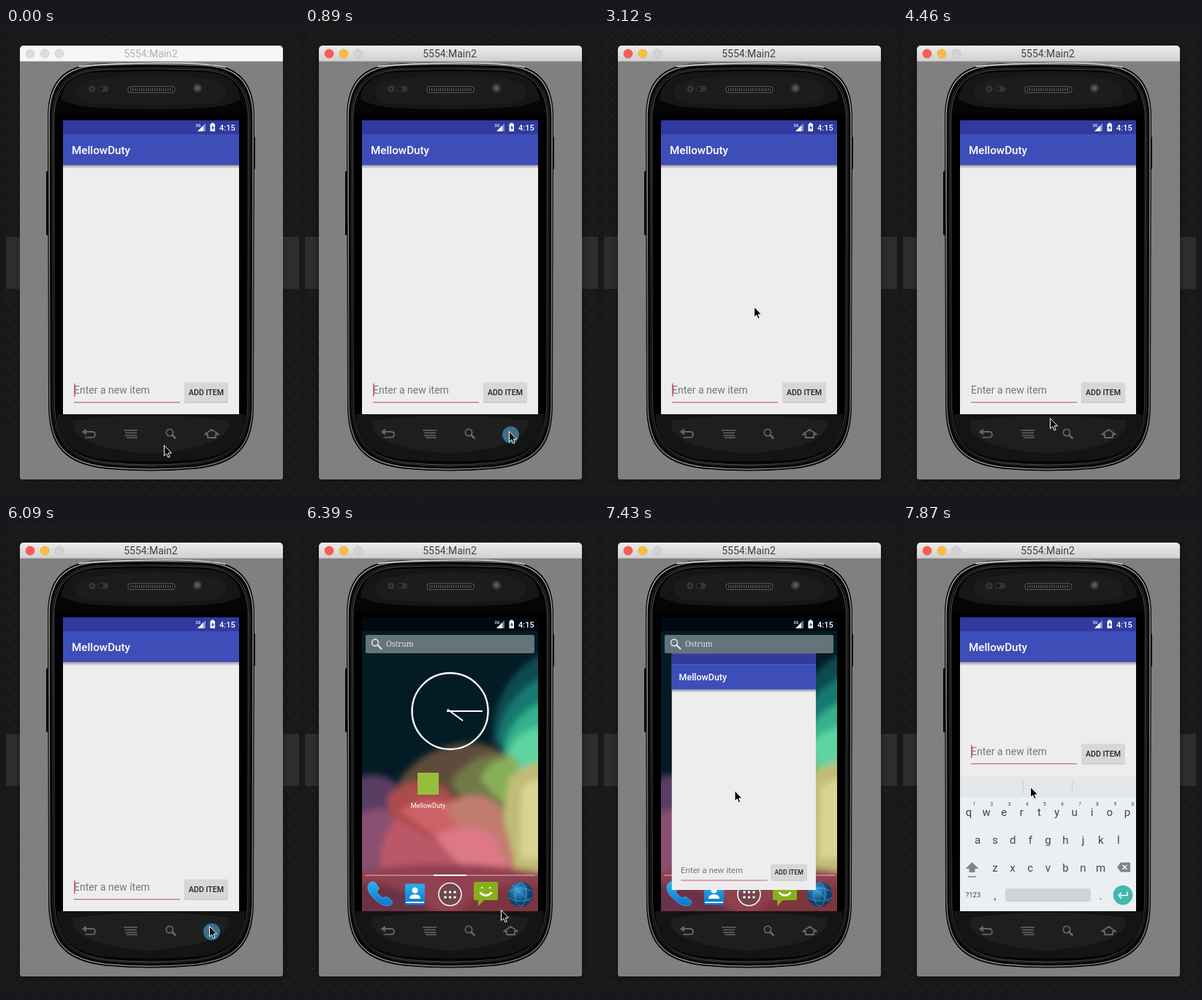
An HTML page that plays this animation: 401 px wide and 640 px high, repeating every 8 s.

```html
<!DOCTYPE html>
<html lang="en">
<head>
<meta charset="utf-8">
<title>Emulator demo</title>
<style>
  html, body { margin: 0; width: 100%; height: 100%; overflow: hidden; background: #191919; }
  svg { display: block; width: 100%; height: 100%; font-family: Roboto, sans-serif; }
  .mid { text-anchor: middle; }
  .medium { font-weight: 500; }
  .line { fill: none; stroke-linecap: round; stroke-linejoin: round; }
  #title { font-size: 14px; fill: #414141; }
  .idle #title { fill: #b3b3b3; }
  .idle #lights circle { fill: #dcdcdc; stroke: #cfcfcf; }
  .idle #bar { fill: #f6f6f6; }
  .idle #shadow { opacity: .1; }
  #keys { fill: #37474f; font-size: 15px; }
</style>
</head>
<body>
<svg id="stage" viewBox="0 0 401 640" preserveAspectRatio="none">
  <defs>
    <pattern id="weave" width="22" height="22" patternUnits="userSpaceOnUse">
      <path d="M0 0L22 22M22 0L0 22" stroke="#252525" stroke-width=".8"/>
    </pattern>
    <linearGradient id="barFill" x2="0" y2="1">
      <stop stop-color="#ececec"/><stop offset="1" stop-color="#d0d0d0"/>
    </linearGradient>
    <linearGradient id="rim" x2="1" y2=".6">
      <stop stop-color="#b5b5b5"/><stop offset=".3" stop-color="#6c6c6c"/>
      <stop offset=".75" stop-color="#a5a5a5"/><stop offset="1" stop-color="#777"/>
    </linearGradient>
    <linearGradient id="drop" x2="0" y2="1">
      <stop stop-opacity=".36"/><stop offset="1" stop-opacity="0"/>
    </linearGradient>
    <radialGradient id="globe" cx=".4" cy=".35">
      <stop stop-color="#38a4dc"/><stop offset="1" stop-color="#0b3f6c"/>
    </radialGradient>
    <linearGradient id="blue" x2="0" y2="1">
      <stop stop-color="#29b1ee"/><stop offset="1" stop-color="#0877c8"/>
    </linearGradient>
    <filter id="soft" x="-50%" y="-50%" width="200%" height="200%"><feGaussianBlur stdDeviation="4"/></filter>
    <clipPath id="screen"><path d="M78 126H319V527H78Z"/></clipPath>
    <path id="body" d="M57.500 122C57.500 74 78 51 126 49Q198 46 271 49C319 51 339.500 74 339.500 122L338.500 515C338 570 318 594 262 601Q198 607 135 601C79 594 59 570 58.500 515Z"/>
  </defs>

  <!-- desktop and window -->
  <path d="M0 0H401V640H0Z" fill="#191919"/>
  <path d="M0 0H401V640H0Z" fill="url(#weave)"/>
  <path d="M0 285H401V356H0Z" fill="#2d2d2d"/>
  <rect id="shadow" x="18" y="30" width="362" height="588" rx="5" opacity=".3" filter="url(#soft)"/>
  <path d="M19 45H379V613a3 3 0 0 1-3 3H22a3 3 0 0 1-3-3Z" fill="#808080"/>
  <path id="bar" d="M19 45.500V29a5 5 0 0 1 5-5H374a5 5 0 0 1 5 5V45.500Z" fill="url(#barFill)"/>
  <g id="lights" stroke-width=".6">
    <circle cx="33" cy="35" r="6" fill="#fc5b57" stroke="#df4744"/>
    <circle cx="53" cy="35" r="6" fill="#fdbc40" stroke="#de9f34"/>
    <circle cx="73" cy="35" r="6" fill="#d3d3d3" stroke="#bcbcbc"/>
  </g>
  <text id="title" class="mid" x="198" y="40">5554:Main2</text>

  <!-- phone -->
  <path d="M55 197q0-2 3-2V283q-3 0-3-2ZM339 148q2 0 2 2V191q0 2-2 2Z"/>
  <use href="#body" fill="#050505" stroke="#050505"/>
  <g fill="none" stroke="url(#rim)">
    <use href="#body" transform="translate(2 2.300) scale(.990 .993)" stroke-width="1.400"/>
    <use href="#body" transform="translate(8 7.500) scale(.960 .977)" stroke-width=".8" opacity=".45"/>
    <use href="#body" transform="translate(11 9.500) scale(.945 .971)" stroke-width=".8" opacity=".65"/>
  </g>
  <path d="M100 52.500Q120 49 198 48T300 53.500" class="line" stroke="#ddd" stroke-width="1.500"/>
  <path d="M76 98C78 74 95 62 125 60.500Q198 57 272 60.500C302 62 319 74 321 98Q300 108 270 109Q198 113 127 109Q96 108 76 98Z" fill="#161616"/>
  <path d="M98 80Q110 66 198 65T300 80Q308 100 280 103Q198 108 117 103Q90 100 98 80Z" fill="#1c1c1c"/>
  <path d="M70 527H327C327 564 306 584 260 589Q198 594 137 589C91 584 70 564 70 527Z" fill="#141414"/>
  <path d="M92 536Q198 522 305 536Q310 572 198 581Q84 572 92 536Z" fill="#1e1e1e"/>
  <path d="M68 118H329V527H68Z"/>
  <rect x="167" y="80" width="64" height="8" rx="3" fill="#111" stroke="#626262"/>
  <path d="M170 84H228" stroke="#555" stroke-width="4" stroke-dasharray="1.500 1.500"/>
  <circle cx="118" cy="83" r="4.500" fill="#363636"/><circle cx="118" cy="83" r="1.500" fill="#191919"/>
  <rect x="126" y="79" width="14" height="8" rx="4" fill="#303539"/><circle cx="130" cy="83" r="3" fill="#17191b"/>
  <circle cx="262" cy="82" r="6" fill="#383b3d"/><circle cx="262" cy="82" r="3" fill="#565b5f"/>

  <circle id="hover" cy="555" r="11.500" fill="#2b7398"/>
  <g class="line" stroke="#666" stroke-width="1.800">
    <path d="M108 551H118q4 0 4 3.800t-4 3.800H109"/><path d="M104.500 551l5-3.500v7Z" fill="#666" stroke-width="1"/>
    <path d="M161 549H180M163 552.500H179M163 556H179M165 559H180" stroke-width="1.400" stroke-linecap="butt"/>
    <circle cx="224" cy="552" r="4.600"/><path d="M227.500 555.500l4 4" stroke-width="2.800"/>
    <path d="M272 554.500l9.500-6.500 9.500 6.500h-4v4.500h-11v-4.500Z"/>
  </g>

  <g clip-path="url(#screen)">
    <!-- launcher -->
    <g id="home">
      <path d="M78 126H319V527H78Z" fill="#031b25"/>
      <g filter="url(#soft)">
        <path d="M330 172Q254 212 257 295L330 330Z" fill="#0b4b50"/>
        <path d="M330 205Q266 235 264 300L330 340Z" fill="#16796f"/>
        <path d="M330 240Q276 258 270 320L330 350Z" fill="#36b18b"/>
        <path d="M330 275Q282 278 274 325L330 360Z" fill="#5ed3a0"/>
        <path d="M128 350Q160 302 225 297Q285 300 300 350L290 470H150Z" fill="#5d4c3b"/>
        <path d="M200 350Q230 308 278 312L298 400L250 440Z" fill="#71794a"/>
        <path d="M240 345Q255 315 290 318L300 385Q265 385 240 345Z" fill="#87b057"/>
        <path d="M280 345Q300 325 330 322V480H275Q265 400 280 345Z" fill="#bfbd75"/>
        <path d="M296 360Q310 345 330 345V455H295Z" fill="#dbd394"/>
        <path d="M66 348Q105 328 140 365L190 540H66Z" fill="#593d62"/>
        <path d="M66 400Q105 370 145 410L180 540H66Z" fill="#885071"/>
        <path d="M112 372Q150 332 195 362L285 470H165Q118 425 112 372Z" fill="#ac4b4e"/>
        <path d="M130 390Q170 362 215 390L285 465L240 472Z" fill="#ce6266"/>
        <path d="M190 385Q235 352 268 385L288 465H245Z" fill="#c17b70"/>
        <path d="M125 400L245 472L110 485Q92 440 125 400Z" fill="#bb5967"/>
        <path d="M178 425Q225 400 260 425L278 468H215Z" fill="#dd7986"/>
        <path d="M66 475Q180 450 330 475V540H66Z" fill="#91414f"/>
        <path d="M66 490Q130 480 190 540H66Z" fill="#69334a"/>
        <path d="M200 540Q245 480 330 492V540Z" fill="#7c343c"/>
      </g>
      <path d="M78 126H319V145H78Z" fill="#000910"/>
      <rect x="83" y="150" width="231" height="25" rx="2" fill="#64747a"/>
      <g class="line" stroke="#eee" stroke-width="1.400"><circle cx="96" cy="160.500" r="4.500"/><path d="M99.500 164l5 5" stroke-width="2"/></g>
      <text x="111" y="166" font-family="'Noto Serif', serif" font-size="10.500" fill="#dde2e4">Ostrum</text>
      <g class="line" stroke="#fff" stroke-width="2.400">
        <circle cx="198.500" cy="254" r="52"/>
        <path d="M194 254H243M195 251.500L216 267" stroke-width="2" stroke-linecap="butt"/>
      </g>
      <rect x="154" y="338" width="29" height="30" fill="#97bd3d"/>
      <text class="mid" x="168.500" y="386" font-size="9.200" fill="#fff">MellowDuty</text>
      <path d="M82 478H315" stroke="#fff" opacity=".65"/><path d="M176 478H221" stroke="#fff" stroke-width="2"/>
      <path d="M89 488q5-3 8 1l4 6q1 3-3 5 3 6 9 9 3-3 6-1l6 5q2 3-2 6-8 3-19-6Q84 501 86 492Z" fill="url(#blue)" stroke="#57c5f5" stroke-width=".6"/>
      <rect x="137" y="489.500" width="27" height="29" rx="2" fill="url(#blue)"/>
      <path d="M138 515H163" stroke="#eee" stroke-width="2"/>
      <circle cx="150.500" cy="498.500" r="4" fill="#fff"/><path d="M143 510q0-6 7.500-6t7.500 6Z" fill="#fff"/>
      <circle cx="198.500" cy="504" r="15.500" fill="#5b4b50" fill-opacity=".6" stroke="#eee" stroke-width="1.700"/>
      <path d="M192 501H206M192 508H206" class="line" stroke="#fff" stroke-width="3.600" stroke-dasharray="0 6.500"/>
      <path d="M233 487H262q2 0 2 2V510q0 2-2 2H245L237 520V512H233q-2 0-2-2V489q0-2 2-2Z" fill="#86b01b"/>
      <path d="M240 502q7.500 7 15 0M242 495v.1M253 495v.1" class="line" stroke="#fff" stroke-width="2.400"/>
      <circle cx="295" cy="504" r="17" fill="url(#globe)"/>
      <g class="line" stroke="#70bde2" opacity=".6"><ellipse cx="295" cy="504" rx="8" ry="16"/><path d="M279 500Q295 490 311 500M279 509Q295 518 311 509M284 492L308 514"/></g>
    </g>

    <!-- todo app -->
    <g id="app">
      <path d="M78 126H319V527H78Z" fill="#ededed"/>
      <path d="M78 187H319V192H78Z" fill="url(#drop)"/>
      <path d="M78 126H319V145H78Z" fill="#303a9f"/>
      <path d="M78 145H319V187H78Z" fill="#3e4eb8"/>
      <text class="medium" x="90" y="171.500" font-size="15.200" fill="#fff">MellowDuty</text>
      <g id="entry">
        <text x="93" y="499" font-size="14" fill="#777">Enter a new item</text>
        <path d="M93 510.800H238" stroke="#d37792" stroke-width="1.600"/>
        <path id="caret" d="M93.800 485V503" stroke="#d8487b" stroke-width="1.400"/>
        <rect x="244" y="484.500" width="60" height="27" rx="2" fill="#bbb"/>
        <rect x="244" y="483.500" width="60" height="27" rx="2" fill="#d6d8d7"/>
        <text class="mid medium" x="274" y="501" font-size="10.600" fill="#222">ADD ITEM</text>
      </g>
      <g id="keyboard">
        <path d="M78 343H319V527H78Z" fill="#ebeff2"/><path d="M78 343H319V372H78Z" fill="#e3e7ea"/>
        <path d="M164.500 348V367M231.500 348V367" stroke="#c8ced1"/>
        <g id="keys" class="mid"></g>
        <path d="M94.500 460l9 9h-5v5h-8v-5h-5Z" fill="#78878d"/><path d="M89 480H100" stroke="#78878d" stroke-width="1.500"/>
        <path d="M293 467l5-6.500H311V473.500H298Z" fill="#78878d"/><path d="M300.500 464l6 6m0-6l-6 6" stroke="#fff" stroke-width="1.400"/>
        <rect x="140" y="496" width="117" height="18" rx="3" fill="#ced5d9"/>
        <circle cx="301" cy="505" r="13.300" fill="#43b7ac"/>
        <path d="M307 501v4.500H295m3.500-3.500l-3.500 3.500 3.500 3.500" class="line" stroke="#fff" stroke-width="1.600"/>
      </g>
    </g>

    <!-- status icons -->
    <g fill="#fff">
      <text class="medium" x="259.500" y="135" font-size="5.500">3G</text>
      <path d="M262 141L270 133V141Z"/><path d="M270 133L273 130V141H270Z" opacity=".45"/>
      <path d="M281 129.500h3.500v1.500h1.500V141H279.500V131H281Z"/><path d="M283.500 132.500l-2.500 4h1.700v3l2.500-4h-1.700Z" fill="#333b80"/>
      <text class="medium" x="292" y="140" font-size="11">4:15</text>
    </g>
  </g>

  <path id="cursor" d="M.5 .5V14.800L3.700 11.800L6 17L8.200 16L6 11H10.500Z" stroke="#fff"/>
</svg>
<script>
  const LOOP = 8000, STEP = 148.5;
  const $ = id => document.getElementById(id);
  const stage = $('stage'), cursor = $('cursor'), hover = $('hover');

  // step, tip x, tip y
  const path = [
    [0, 216, 569], [2, 226, 566], [4, 255, 558], [6, 279, 550], [8, 279, 549],
    [9, 268, 500], [10, 235, 408], [11, 217, 349], [12, 217, 349],
    [14, 211, 338], [17, 206, 321], [18, 206, 321], [20, 205, 345],
    [23, 205, 450], [26, 204, 526], [28, 202, 531], [29, 202, 531],
    [30, 201, 532], [35, 201, 532], [36, 204, 538], [38, 252, 553],
    [40, 278, 548], [41, 278, 547], [42, 277, 545], [43, 268, 525],
    [45, 235, 460], [47, 184, 370], [49, 179, 362], [51, 178, 362], [53, 174, 357]
  ];
  const buttons = [113, 170, 225, 281.5];

  function tipAt(step) {
    const i = path.findIndex(p => p[0] >= step);
    if (i <= 0) return path[0].slice(1);
    const [s0, x0, y0] = path[i - 1], [s1, x1, y1] = path[i];
    const k = (step - s0) / (s1 - s0);
    return [x0 + (x1 - x0) * k, y0 + (y1 - y0) * k];
  }

  function addKey(label, x, y, size) {
    const key = document.createElementNS('http://www.w3.org/2000/svg', 'text');
    key.textContent = label;
    key.setAttribute('x', x);
    key.setAttribute('y', y);
    if (size) key.style.fontSize = size + 'px';
    $('keys').append(key);
  }

  [['qwertyuiop', 90], ['asdfghjkl', 102], ['zxcvbnm', 126]].forEach(([row, x], r) =>
    [...row].forEach((c, i) => addKey(c, x + i * 24.1, 397 + r * 38)));
  [...'1234567890'].forEach((c, i) => addKey(c, 97.5 + i * 24.1, 383, 6.5));
  addKey('?123', 96, 508, 9.5);
  addKey(',', 126, 511);
  addKey('.', 270.5, 511);

  const show = (el, on) => el.setAttribute('visibility', on ? 'inherit' : 'hidden');

  function draw(t) {
    const step = Math.min(53, Math.floor((t + 6) / STEP));
    const time = step * STEP;
    const [x, y] = tipAt(step);
    cursor.setAttribute('transform', `translate(${x} ${y})`);

    const button = buttons.find(b => Math.hypot(x - b, y - 555) < 11.5);
    show(hover, button !== undefined);
    if (button) hover.setAttribute('cx', button);

    stage.classList.toggle('idle', step < 3);
    show($('home'), step >= 43 && step < 52);
    show($('app'), step < 43 || step >= 50);
    const zoom = { 50: 'matrix(.818 0 0 .804 29 74.200)', 51: 'matrix(.98 0 0 .98 3.200 7.400)' };
    $('app').setAttribute('transform', zoom[step] || '');
    const typing = step >= 53;
    show($('keyboard'), typing);
    $('entry').setAttribute('transform', `translate(0 ${typing ? -185 : 0})`);
    show($('caret'), typing || (step < 50 && (time + 182) % 1000 < 500));
  }

  function tick() {
    draw(performance.now() % LOOP);
    requestAnimationFrame(tick);
  }
  tick();
</script>
</body>
</html>
```
